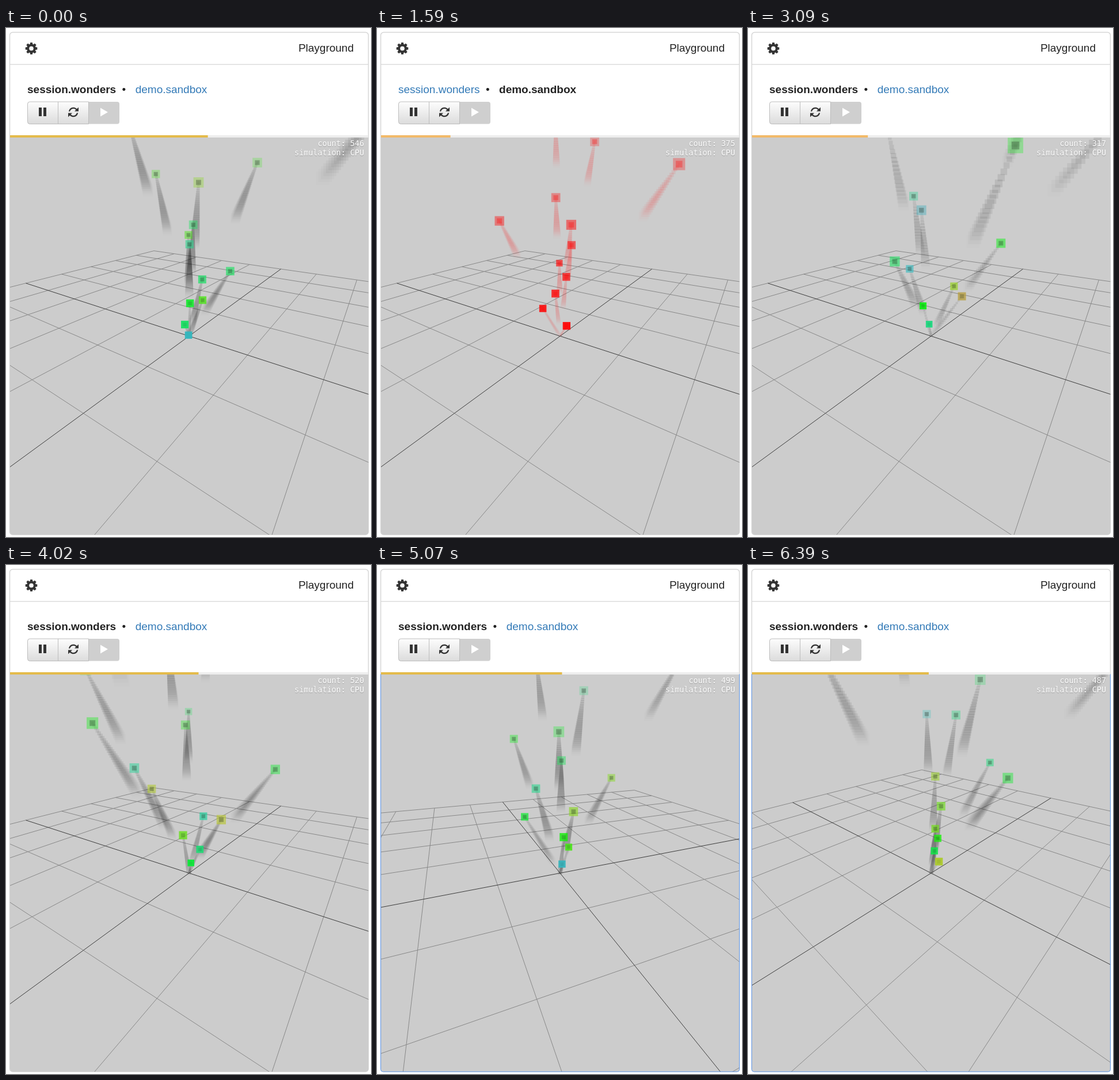
Animation, 634 px wide and 883 px high, one loop 6.42 s. Source, as an HTML page with a canvas:

```html
<!DOCTYPE html>
<html lang="en">
<head>
<meta charset="utf-8">
<title>Playground</title>
<style>
  html, body { margin: 0; width: 634px; height: 883px; overflow: hidden; background: #fff; }
  canvas { position: absolute; left: 0; top: 0; }
  div { position: absolute; white-space: pre; }
  .ui { font: 19px/22px "Liberation Sans", Arial, sans-serif; color: #222; }
  #brand { right: 30px; top: 24px; }
  #tabs { left: 37px; top: 96px; }
  #tabs span { color: #337ab7; }
  #tabs span.on { color: #222; font-weight: bold; }
  #tabs i { font-style: normal; display: inline-block; width: 33.5px; text-align: center; text-indent: -6px; }
  #hud { right: 12px; top: 193px; text-align: right; color: #fff;
         font: 13.4px/16px "DejaVu Sans Mono", monospace; text-shadow: 0 1px 1px rgba(0,0,0,.25); }
</style>
</head>
<body>
<canvas id="view" width="634" height="883"></canvas>
<div id="brand" class="ui">Playground</div>
<div id="tabs" class="ui"><span id="tabA">session.wonders</span><i>•</i><span id="tabB">demo.sandbox</span></div>
<div id="hud"></div>
<script>
const $ = id => document.getElementById(id);
const ctx = $('view').getContext('2d');
const LOOP = 6420, STEP = 30;
const RED_ON = 720, RED_OFF = 2070, DRAG = 4700;
const CX = 318, CY = 534.5, FOCAL = 449;   // lengths are in camera distances
const HALF = 1.2, CELLS = 5;               // ground grid
const SPAN = 55, LIFE = 16;                // ms between heads, life in spans
const RISE = .0535, SPREAD = .75;          // climb per span, cone width

const clamp = (v, a, b) => Math.min(b, Math.max(a, v));

// Simulation time stands still while a new scene loads.
const clock = t => t - clamp(t - 1170, 0, 210) - clamp(t - RED_OFF, 0, 90);

const runs = [
  { seed: 3, start: -1600, rate: .341, full: 541, max: 1000, tail: 3.1 },
  { seed: 8, start: clock(RED_ON), rate: .568, full: 600, max: 2000, tail: 2.1, red: true },
  { seed: 5, start: clock(RED_OFF), rate: .341, full: 505, max: 1000, tail: 3.1 },
];
const runAt = t => runs[t < RED_ON ? 0 : t < RED_OFF ? 1 : 2];

function countAt(run, t) {
  const level = run.full + 20 * Math.cos((t - 5610) / 1800 * 2 * Math.PI);
  return Math.round(Math.min(run.rate * (clock(t) - run.start), level));
}

// time, azimuth in degrees, cosine of the polar angle
const turns = [[DRAG, 33.67, .486], [5070, 68.56, .486], [5610, 121.78, .5518], [5940, 132.07, .5646]];

function cameraAt(t) {
  const i = clamp(turns.findIndex(k => t < k[0]), 1, turns.length - 1);
  const last = turns[turns.length - 1];
  const a = turns[i - 1], b = t >= last[0] ? last : turns[i];
  const u = clamp((t - a[0]) / (b[0] - a[0]), 0, 1);
  const from = t >= last[0] ? last : a;
  const angle = (from[1] + (b[1] - from[1]) * u) * Math.PI / 180;
  const c = from[2] + (b[2] - from[2]) * u;
  return { ca: Math.cos(angle), sa: Math.sin(angle), c, s: Math.sqrt(1 - c * c) };
}

// World point to sideways, downward and depth in the camera frame.
function place(cam, x, y, z) {
  const r = z * cam.sa - x * cam.ca, q = -x * cam.sa - z * cam.ca;
  return [r, q * cam.c - y * cam.s, 1 - q * cam.s - y * cam.c];
}
const toScreen = p => [CX + FOCAL * p[0] / p[2], CY + FOCAL * p[1] / p[2]];

function drawLine(p, q) {
  const near = .08;
  const cut = (a, b) => {
    const u = (near - a[2]) / (b[2] - a[2]);
    return a.map((v, i) => v + (b[i] - v) * u);
  };
  if (p[2] < near && q[2] < near) return;
  if (p[2] < near) p = cut(p, q);
  if (q[2] < near) q = cut(q, p);
  ctx.beginPath();
  ctx.moveTo(...toScreen(p));
  ctx.lineTo(...toScreen(q));
  ctx.stroke();
}

function drawGrid(cam) {
  ctx.lineWidth = 1;
  for (const axis of [false, true]) {
    ctx.strokeStyle = axis ? '#3c3c3c' : '#888';
    for (let i = -CELLS; i <= CELLS; i++) {
      if ((i === 0) !== axis) continue;
      const k = i * HALF / CELLS;
      drawLine(place(cam, k, 0, -HALF), place(cam, k, 0, HALF));
      drawLine(place(cam, -HALF, 0, k), place(cam, HALF, 0, k));
    }
  }
}

function headOf(run, i) {
  const rnd = k => {
    const v = Math.sin(i * 12.9898 + k * 78.233 + run.seed * 37.719) * 43758.5453;
    return v - Math.floor(v);
  };
  const turn = rnd(1) * 2 * Math.PI, lean = rnd(2) * SPREAD, rise = RISE * (.9 + .2 * rnd(3));
  const hue = 125 + (rnd(4) + rnd(5) + rnd(6) - 1.5) * 60;
  return {
    dir: [rise * lean * Math.cos(turn), rise, rise * lean * Math.sin(turn)],
    color: run.red ? '#f00' : `hsl(${hue},${100 - Math.abs(hue - 120) * .7}%,48%)`,
    size: 11 + 2.5 * rnd(7),
  };
}

function square(cam, dir, age, size, color, alpha) {
  const p = place(cam, ...dir.map(v => v * age));
  if (p[2] < .15) return;
  const [x, y] = toScreen(p), w = size / p[2];
  ctx.globalAlpha = alpha;
  ctx.fillStyle = color;
  ctx.fillRect(x - w / 2, y - w / 2, w, w);
}

function drawTrail(cam, run, { dir }, age, dots) {
  const color = run.red ? '#f00' : '#000';
  for (let i = dots; i >= 0; i--) {
    const u = i / dots, back = age - u * run.tail;
    if (back < 0) continue;
    const size = 3 + (run.red ? 8 : 11) * u * Math.min(1, age / 5);
    square(cam, dir, back, size, color, .16 * (1 - u) * (.4 + 1.2 * u));
  }
}

function drawHead(cam, run, head, age) {
  const fade = Math.pow(1 - age / LIFE, 1.3);
  square(cam, head.dir, age, head.size, head.color, fade);
  if (run.red) square(cam, head.dir, age, head.size * .55, head.color, .3);
  else square(cam, head.dir, age, head.size * .5, '#1c2a1c', .3 * Math.min(1, age / 4));
}

function drawParticles(cam, run, t) {
  const spans = (clock(t) - run.start) / SPAN;
  const dots = Math.max(12, Math.round(countAt(run, t) / 16));
  const live = [];
  for (let i = Math.max(0, Math.ceil(spans - LIFE - run.tail)); i < spans; i++)
    live.push([headOf(run, i), spans - i]);
  for (const [head, age] of live) drawTrail(cam, run, head, age, dots);
  for (const [head, age] of live) if (age < LIFE) drawHead(cam, run, head, age);
  ctx.globalAlpha = 1;
}

function drawStage(run, t) {
  const cam = cameraAt(t);
  ctx.save();
  ctx.beginPath();
  ctx.roundRect(7, 190, 622.5, 689, [0, 0, 5, 5]);
  ctx.clip();
  ctx.fillStyle = '#ccc';
  ctx.fillRect(7, 190, 623, 690);
  drawGrid(cam);
  drawParticles(cam, run, t);
  ctx.restore();
  if (t >= DRAG) {
    ctx.strokeStyle = '#5f96e8';
    ctx.lineWidth = 1;
    ctx.beginPath();
    ctx.roundRect(6.5, 189.5, 623, 689.5, [0, 0, 4, 4]);
    ctx.stroke();
  }
}

function poly(points, color) {
  ctx.fillStyle = color;
  ctx.beginPath();
  points.forEach(([x, y]) => ctx.lineTo(x, y));
  ctx.fill();
}

function drawGear(x, y) {
  ctx.save();
  ctx.translate(x, y);
  for (let i = 0; i < 8; i++) {
    poly([[-2.6, -6], [-1.9, -10.3], [1.9, -10.3], [2.6, -6]], '#333');
    ctx.rotate(Math.PI / 4);
  }
  ctx.strokeStyle = '#333';
  ctx.lineWidth = 4;
  ctx.beginPath();
  ctx.arc(0, 0, 5.8, 0, 7);
  ctx.stroke();
  ctx.restore();
}

function drawReload(x, y) {
  ctx.save();
  ctx.translate(x, y);
  ctx.strokeStyle = '#333';
  ctx.lineWidth = 2.3;
  for (let i = 0; i < 2; i++) {
    ctx.beginPath();
    ctx.arc(0, 0, 7.2, Math.PI * 1.06, Math.PI * 1.8);
    ctx.stroke();
    poly([[9, -8.5], [9, -1.5], [2, -1.5]], '#333');
    ctx.rotate(Math.PI);
  }
  ctx.restore();
}

function drawButtons() {
  const shade = ctx.createLinearGradient(0, 128, 0, 166);
  shade.addColorStop(0, '#fdfdfd');
  shade.addColorStop(1, '#dcdcdc');
  ctx.lineWidth = 1;
  ctx.beginPath();
  ctx.roundRect(37.5, 128, 159.5, 38.5, 4);
  ctx.fillStyle = '#cfcfcf';
  ctx.fill();
  ctx.beginPath();
  ctx.roundRect(37.5, 128, 106, 38.5, [4, 0, 0, 4]);
  ctx.fillStyle = shade;
  ctx.fill();
  ctx.strokeStyle = '#bdbdbd';
  ctx.stroke();
  ctx.fillStyle = '#bdbdbd';
  ctx.fillRect(90, 128, 1, 38);
  ctx.fillStyle = '#333';
  ctx.fillRect(57, 138, 5, 15);
  ctx.fillRect(65, 138, 5, 15);
  drawReload(117, 146);
  poly([[164, 138.5], [177, 146], [164, 153.5]], '#fff');
}

function drawPanel() {
  ctx.fillStyle = '#fff';
  ctx.fillRect(0, 0, 634, 883);
  ctx.strokeStyle = '#d6d6d6';
  ctx.lineWidth = 1.5;
  ctx.beginPath();
  ctx.roundRect(6.5, 7.5, 623, 871.5, 5);
  ctx.stroke();
  ctx.fillStyle = '#ddd';
  ctx.fillRect(7, 62.5, 622, 1.5);
  drawGear(44, 35.5);
  drawButtons();
}

function drawBar(share) {
  ctx.fillStyle = '#eee';
  ctx.fillRect(7, 186, 622, 4);
  ctx.fillStyle = share < .4 ? '#f2ba69' : '#e4bb4b';
  if (share > 0) ctx.fillRect(7, 186, 622 * share + 4, 4);
}

function render(t) {
  const run = runAt(t), count = countAt(run, t);
  drawPanel();
  drawStage(run, t);
  drawBar(count / run.max);
  $('tabA').className = run.red ? '' : 'on';
  $('tabB').className = run.red ? 'on' : '';
  $('hud').textContent = `count: ${count}\nsimulation: CPU`;
}

const start = performance.now();
function tick() {
  const t = (performance.now() - start) % LOOP;
  render(Math.floor(t / STEP) * STEP);
  requestAnimationFrame(tick);
}
tick();
</script>
</body>
</html>
```
